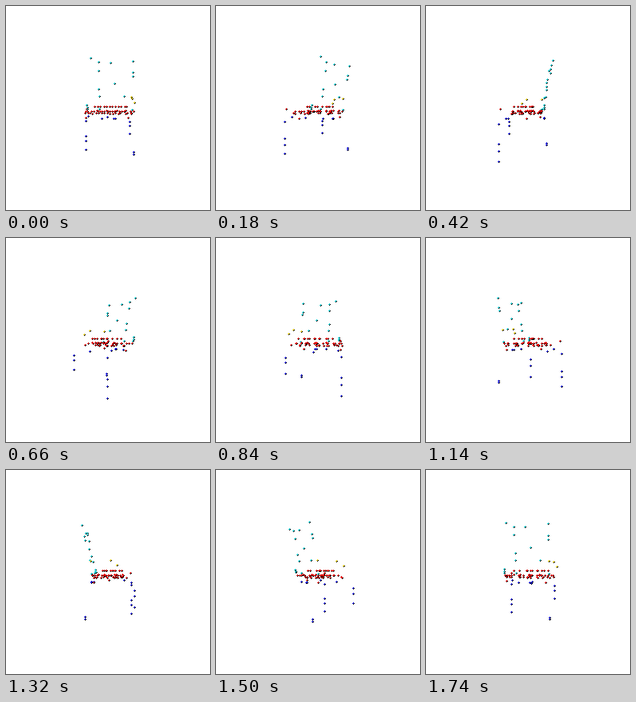
Write a matplotlib script that moves like this. It is 256 px wide and 256 px high and loops after 1.8 s.

```python
import numpy as np
import matplotlib.pyplot as plt
from matplotlib.animation import FuncAnimation

SIZE, DPI = 256, 100
FRAMES, INTERVAL = 30, 60
CAMERA = 218  # distance from the eye to the turning axis

CYAN, RED, BLUE, YELLOW = (0, 200, 205), (225, 0, 0), (0, 0, 215), (225, 200, 0)
BLACK, WHITE = (0, 0, 0), (255, 255, 255)

rng = np.random.default_rng(4)


# Each point is (x, y, z): right, down, towards the viewer.
def post(x, z, heights):
    """Points stacked on one vertical line."""
    return [(x, y, z) for y in heights]


def rest(x, heights):
    """Points on the leaning plane of the backrest."""
    return [(x, y, 18 - 0.2 * y - 0.08 * x) for y in heights]


def slab(height, left, right, count, far, near):
    """A level row of points scattered in depth."""
    return [(x, height, rng.uniform(far, near))
            for x in np.linspace(left, right, count)]


back = (
    rest(-24, (-3.6, -1, 0.5)) + rest(-19, (-54.3,))
    + rest(-10.3, (-50.3, -41.4, -21.6, -13.5, 1))
    + rest(2.6, (-49.4,)) + rest(7.2, (-27.9,)) + rest(18, (-13.5,))
    + rest(27.5, (-52.2, -40.2, -35.8, 1.8))
)
arm = [(34.8, -7.4, -12.5), (31, -12.7, -5.7), (27, -12.5, 16.5)]
legs = (
    post(-31.4, -29.3, (17.7, 39.4, 46.6, 58.6))
    + post(30.6, -31, (19.2, 25.3, 37))
    + post(28.6, 23, (49.2, 51.7))
    + [(x, 12.2, 20) for x in (-7.3, 6.4, 8.2)]
    + [(-27, 11.2, -19.5), (-0.8, 13, -28.5)]
)
seat = (
    slab(-1.8, -17, 24, 12, -19, 7)
    + slab(3.7, -29, 31, 26, -25, 18)
    + slab(6.3, -30, 31, 18, -25, 18)
    + [(-30.5, 0.9, -28), (-28, 11.6, 1.3), (23.5, 11.6, 14)]
)

parts = [(back, CYAN), (arm, YELLOW), (legs, BLUE), (seat, RED)]
points = np.array([p for part, _ in parts for p in part])
colors = np.array([c for part, c in parts for _ in part])

fig = plt.figure(figsize=(SIZE / DPI, SIZE / DPI), dpi=DPI, facecolor="white")
ax = fig.add_axes([0, 0, 1, 1])
ax.axis("off")
stage = ax.imshow(np.full((SIZE, SIZE, 3), WHITE, np.uint8),
                  interpolation="nearest", aspect="auto")


def dot(canvas, x, y, color):
    """A three pixel plus, shaded on its right and lower arms."""
    canvas[y - 1:y + 1, x] = color
    canvas[y, x - 1] = color
    canvas[y, x + 1] = BLACK
    canvas[y + 1, x] = BLACK


def update(frame):
    angle = 2 * np.pi * frame / FRAMES
    x, y, z = points.T
    turned = x * np.cos(angle) + z * np.sin(angle)
    depth = z * np.cos(angle) - x * np.sin(angle)
    scale = CAMERA / (CAMERA - depth)
    columns = np.rint(SIZE / 2 + turned * scale).astype(int)
    rows = np.rint(SIZE / 2 + y * scale).astype(int)

    canvas = np.full((SIZE, SIZE, 3), WHITE, np.uint8)
    for i in np.argsort(depth):
        dot(canvas, columns[i], rows[i], colors[i])
    stage.set_data(canvas)
    return (stage,)


anim = FuncAnimation(fig, update, frames=FRAMES, interval=INTERVAL,
                     repeat=True, repeat_delay=0)
plt.show()
```
